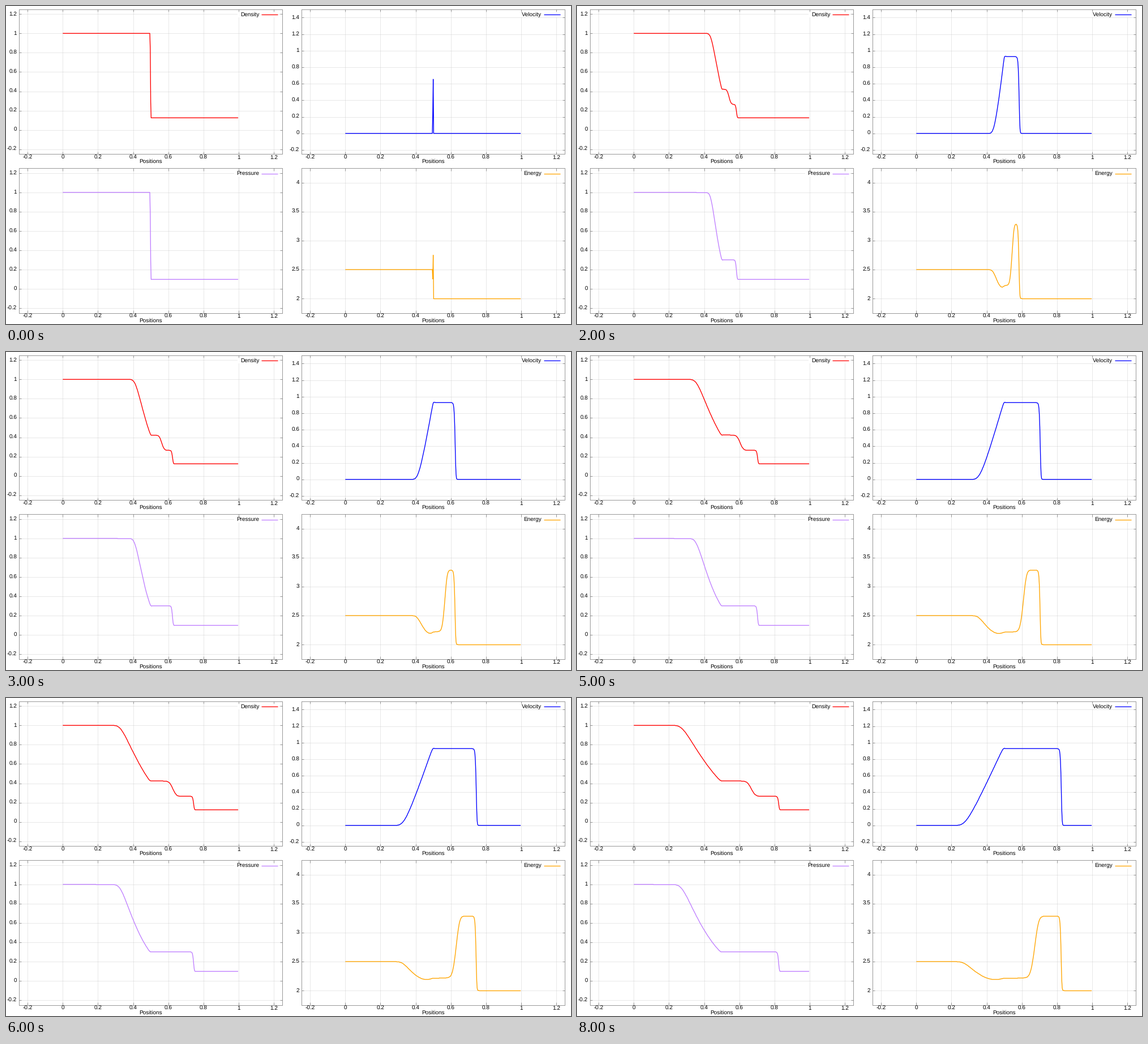
These frames come from a looping animation (998x561 px, 9 s). A matplotlib script:

```python
import numpy as np
import matplotlib.pyplot as plt
from matplotlib.animation import FuncAnimation
from matplotlib.patches import Rectangle

W, H, DPI = 998, 561, 100
PX = 72 / DPI
FRAMES, INTERVAL = 9, 1000
CELLS, STEPS, CFL = 400, 40, 0.5
G1 = 0.4                      # gamma - 1
BOX_W, BOX_H = 465.8, 255.6   # panel size in pixels
LEFT, RIGHT = 22.7, 521.7
TOP, BOTTOM = 5.7, 286.2

plt.rcParams["text.hinting"] = "none"
plt.rcParams["text.hinting_factor"] = 1


# --- Sod shock tube, first-order Roe scheme ---

def primitive(U):
    rho, mom, E = U
    u = mom / rho
    return rho, u, G1 * (E - 0.5 * mom * u)


def roe_flux(U):
    rho, u, p = primitive(U)
    F = np.array([U[1], U[1] * u + p, (U[2] + p) * u])
    h = (U[2] + p) / rho
    w = np.sqrt(rho)
    wl, wr = w[:-1], w[1:]
    ua = (wl * u[:-1] + wr * u[1:]) / (wl + wr)
    ha = (wl * h[:-1] + wr * h[1:]) / (wl + wr)
    c = np.sqrt(G1 * (ha - 0.5 * ua ** 2))
    drho, du, dp = np.diff(rho), np.diff(u), np.diff(p)
    a1 = (dp - wl * wr * c * du) / (2 * c ** 2)
    a3 = (dp + wl * wr * c * du) / (2 * c ** 2)
    a2 = drho - dp / c ** 2
    one = np.ones_like(ua)
    waves = (np.abs(ua - c) * a1 * np.array([one, ua - c, ha - ua * c])
             + np.abs(ua) * a2 * np.array([one, ua, 0.5 * ua ** 2])
             + np.abs(ua + c) * a3 * np.array([one, ua + c, ha + ua * c]))
    return 0.5 * (F[:, :-1] + F[:, 1:]) - 0.5 * waves


def advance(U):
    rho, u, p = primitive(U)
    speed = np.max(np.abs(u) + np.sqrt((1 + G1) * p / rho))
    out = U.copy()
    out[:, 1:-1] -= CFL / speed * np.diff(roe_flux(U), axis=1)
    return out


def solve():
    left = np.arange(CELLS) < CELLS // 2
    U = np.array([np.where(left, 1.0, 0.125),
                  np.zeros(CELLS),
                  np.where(left, 2.5, 0.25)])
    states = []
    for n in range(STEPS * (FRAMES - 1) + 1):
        U = advance(U)
        if n % STEPS == 0:
            rho, u, p = primitive(U)
            states.append((rho, u, p, U[2] / rho))
    return states


# --- Drawing, in pixels with y pointing down ---

fig = plt.figure(figsize=(W / DPI, H / DPI), dpi=DPI, facecolor="white")
ax = fig.add_axes([0, 0, 1, 1])
ax.set_xlim(0, W)
ax.set_ylim(H, 0)
ax.axis("off")


def stroke(xs, ys, color, width, **kw):
    return ax.plot(xs, ys, color=color, lw=width * PX, **kw)[0]


def put(x, y, s, ha="center"):
    ax.text(x, y, s, ha=ha, va="baseline", fontsize=9.6 * PX,
            family="Liberation Sans", color="black", zorder=5)


class Panel:
    def __init__(self, name, color, x0, y0, lo, hi, ticks, floor=False):
        self.x0, self.y0, self.lo, self.hi = x0, y0, lo, hi
        self.floor = floor
        x1, y1 = x0 + BOX_W, y0 + BOX_H
        for v in np.arange(-1, 7) * 0.2:
            x = self.px(v)
            self.grid([x, x], [y0, y1])
            self.tick([x, x], [y0, y0 + 4.5])
            self.tick([x, x], [y1 - 4.5, y1])
            put(x, y1 + 8.3, f"{v:g}")
        for v in ticks:
            y = self.py(v)
            self.grid([x0, x1], [y, y])
            self.tick([x0, x0 + 4.5], [y, y])
            self.tick([x1 - 4.5, x1], [y, y])
            put(x0 - 3.6, y + 2.5, f"{v:g}", "right")
        self.tick([x0, x1, x1, x0, x0], [y0, y0, y1, y1, y0])
        put((x0 + x1) / 2, y1 + 16.1, "Positions")

        text_end = x0 + 424.4
        key = text_end - 5.5 * len(name)
        ax.add_patch(Rectangle((key, y0 + 4.6), x0 + 459 - key, 10,
                               fc="white", ec="none", zorder=2))
        put(text_end, y0 + 12.2, name, "right")
        stroke([x0 + 428.5, x0 + 457.3], [y0 + 9.6] * 2, color, 1.3,
               zorder=4, solid_capstyle="butt")
        self.line = stroke([], [], color, 1.35, zorder=4, snap=False,
                           solid_joinstyle="round", solid_capstyle="butt")

    def px(self, v):
        return self.x0 + (v + 0.25) / 1.5 * BOX_W

    def py(self, v):
        return self.y0 + (self.hi - v) / (self.hi - self.lo) * BOX_H

    def grid(self, xs, ys):
        stroke(xs, ys, "#c6c6c6", 0.8, zorder=1, dashes=(1.25, 1.25),
               dash_capstyle="butt")

    def tick(self, xs, ys):
        stroke(xs, ys, "#808080", 0.8, zorder=3, solid_capstyle="butt")

    def show(self, x, v):
        # values land on a half-pixel raster counted from 1
        step = 0.5 * (self.hi - self.lo) / BOX_H
        k = (v - 1) / step
        k = np.floor(k + 1e-13) if self.floor else np.round(k)
        self.line.set_data(self.px(x), self.py(1 + k * step))


unit = np.arange(-1, 7) * 0.2
panels = [
    Panel("Density", "#ff0000", LEFT, TOP, -0.25, 1.25, unit),
    Panel("Velocity", "#0000ff", RIGHT, TOP, -0.25, 1.5, np.arange(-1, 8) * 0.2),
    Panel("Pressure", "#c080ff", LEFT, BOTTOM, -0.25, 1.25, unit, floor=True),
    Panel("Energy", "#ffa500", RIGHT, BOTTOM, 1.75, 4.25, np.arange(4, 9) * 0.5),
]
states = solve()
pos = np.arange(CELLS) / CELLS


def update(i):
    for panel, values in zip(panels, states[i]):
        panel.show(pos, values)
    return [panel.line for panel in panels]


anim = FuncAnimation(fig, update, frames=FRAMES, interval=INTERVAL,
                     repeat=True, repeat_delay=0, blit=False)
plt.show()
```
